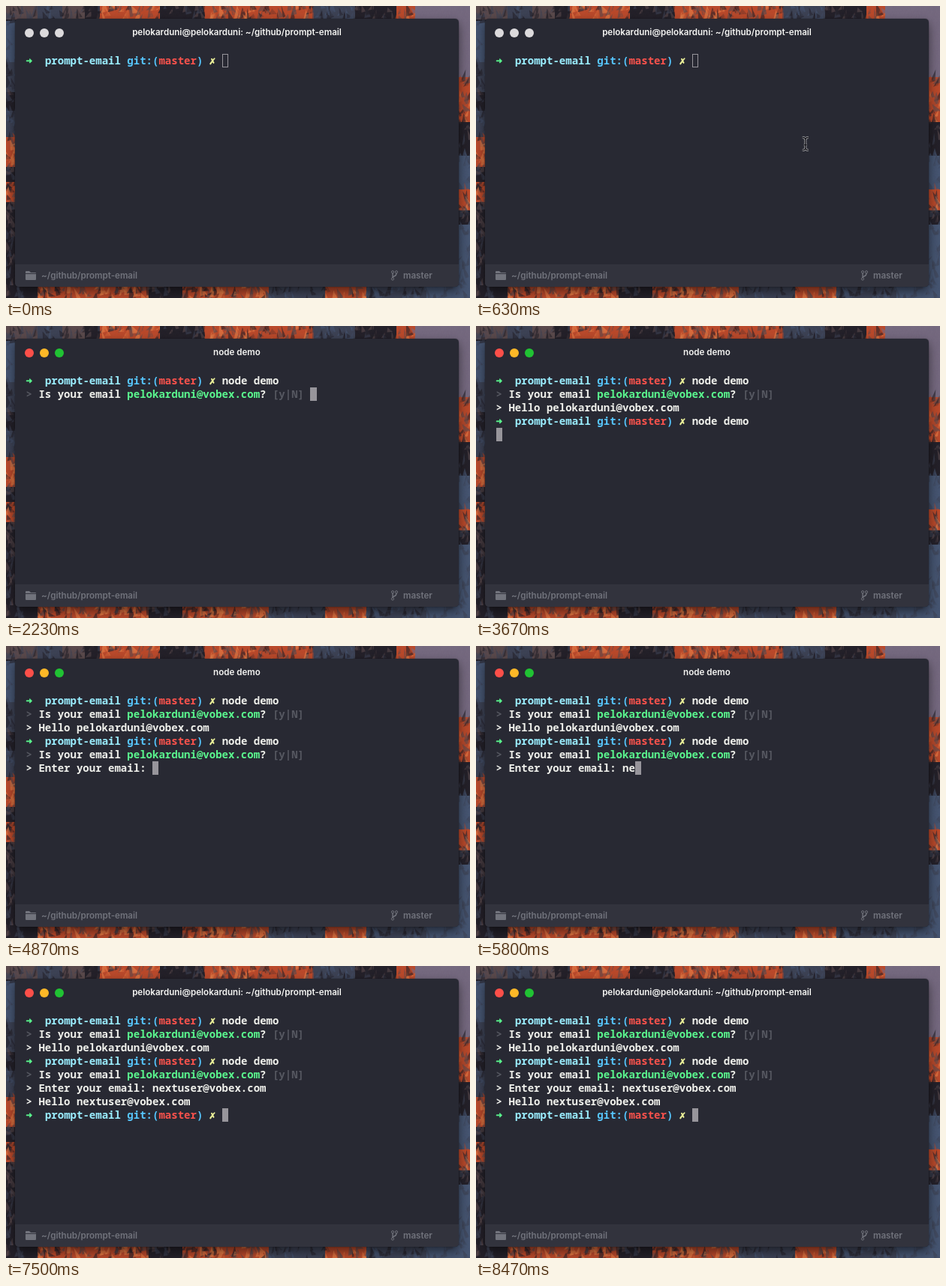
An HTML page with a canvas that plays this animation: 618 px wide and 390 px high, repeating every 8510 ms.

```html
<!DOCTYPE html>
<html lang="en">
<head>
<meta charset="utf-8">
<title>Terminal demo</title>
<style>
  html, body { margin: 0; width: 100%; height: 100%; overflow: hidden; background: #1d1b23; }
  #stage { position: relative; width: 618px; height: 390px; overflow: hidden; }
  #stage > *, #win > * { position: absolute; }
  #win, #shadow { left: 12px; top: 17px; width: 591px; height: 358px; border-radius: 5px; }
  #win { background: #282933; overflow: hidden; font: 600 11.6px/16px Inter, sans-serif; }
  #shadow { box-shadow: 0 6px 14px rgba(0, 0, 0, .5), 0 0 1px #000; }
  #title { left: 0; top: 10px; width: 591px; text-align: center; color: #f4f4f2; }
  #bar { left: 0; top: 328px; width: 591px; height: 30px; background: #32333d; color: #71737c; }
  #bar span { position: absolute; top: 7px; white-space: pre; }
  #term {
    left: 14.6px; top: 47px; margin: 0; isolation: isolate; color: #eff0eb;
    font: 600 14.04px/18px "Noto Sans Mono", "DejaVu Sans Mono", monospace;
  }
  #term div { height: 18px; white-space: pre; }
  .glyph {
    display: inline-block; width: 1ch; height: 18px; vertical-align: top;
    font-family: "DejaVu Sans Mono", monospace; -webkit-text-stroke: .5px;
  }
  .cursor {
    position: absolute; z-index: -1; box-sizing: border-box; width: 1ch; height: 18px;
    border: 1px solid #97959b;
  }
  .focus .cursor { background: #97959b; }
  .green { color: #5af78e; } .cyan { color: #9aedfe; } .blue { color: #57c7ff; }
  .red { color: #f8524c; } .yellow { color: #f3f99d; } .dim { color: #565861; }
  #lights circle { fill: #dcdadc; }
  .focus #lights circle { fill: var(--c); }
</style>
</head>
<body>
<div id="stage">
  <canvas id="desk" width="618" height="390"></canvas>
  <div id="shadow"></div>
  <div id="win">
    <svg id="lights" width="80" height="40">
      <circle cx="19" cy="19" r="6" style="--c:#fc4f49"/>
      <circle cx="39" cy="19" r="6" style="--c:#fdb827"/>
      <circle cx="59" cy="19" r="6" style="--c:#20c233"/>
    </svg>
    <div id="title"></div>
    <pre id="term"></pre>
    <div id="bar">
      <svg width="591" height="30" fill="none" stroke="#71737c">
        <path d="M14 10q0-1 1-1h4l2 2h6q1 0 1 1v8q0 1-1 1H15q-1 0-1-1z" fill="#71737c" stroke="none"/>
        <path d="M14 12.5h14" stroke="#32333d"/>
        <path d="M503 12v6M508 12q0 3-3 4q-2 1-2 2" stroke-width="1.4"/>
        <circle cx="503" cy="10.3" r="1.6"/><circle cx="508" cy="10.3" r="1.6"/><circle cx="503" cy="19.5" r="1.6"/>
      </svg>
      <span style="left:35px">~/github/prompt-email</span>
      <span style="left:517px">master</span>
    </div>
  </div>
  <svg id="mouse" width="12" height="20" fill="none">
    <defs><path id="beam" d="M2 1.5q4 0 4 3v11q0 3-4 3M10 1.5q-4 0-4 3v11q0 3 4 3M4 11.5h4"/></defs>
    <use href="#beam" stroke="#a8a8ac" stroke-width="3"/>
    <use href="#beam" stroke="#15151a" stroke-width="1.4"/>
  </svg>
</div>
<script>
const LOOP = 8510, USER = 'pelokarduni', HOST = 'vobex.com';
const MAIL = USER + '@' + HOST, OTHER = 'nextuser@' + HOST;
const $ = id => document.getElementById(id);
const ink = (color, text) => `<span class="${color}">${text}</span>`;

const PROMPT = ink('green glyph', '➜') + '  ' + ink('cyan', 'prompt-email') + ' ' +
  ink('blue', 'git:(') + ink('red', 'master') + ink('blue', ')') + ' ' + ink('yellow glyph', '✗') + ' ';
const QUESTION = ink('dim', '&gt;') + ' Is your email ' + ink('green', MAIL) + '? ' + ink('dim', '[y|N]') + ' ';
const say = text => '&gt; ' + text;

function screen(t) {
  const typed = (text, start, step) => text.slice(0, Math.max(0, Math.floor((t - start) / step) + 1));
  const lines = [PROMPT + typed('node demo', 1330, 48)];
  const add = (start, text) => t >= start && lines.push(text);
  let ghost = '';

  add(1780, t < 2000 ? '' : QUESTION);
  add(2870, say('Hello ' + MAIL));
  add(2930, PROMPT + (t < 3430 ? '' : 'node demo'));
  add(3640, t < 3830 ? '' : QUESTION);
  let answer = typed(OTHER.slice(0, 9), 5570, 130);
  if (t >= 7100) answer = OTHER;
  else if (answer.endsWith('@')) ghost = ink('dim', HOST);
  add(4700, say('Enter your email: ' + answer));
  add(7330, say('Hello ' + OTHER));
  add(7430, PROMPT);

  lines.push(lines.pop() + '<span class="cursor"></span>' + ghost);
  return lines.map(line => `<div>${line}</div>`).join('');
}

// Rocky desktop: colour runs along each edge, broken up by seeded shards.
function paintDesk() {
  const g = $('desk').getContext('2d');
  const tones = {
    d: '#24212a', s: '#3d4355', n: '#465571', o: '#b94a2c', l: '#e98249', b: '#5a4a4c', y: '#75697f'
  };
  const mixes = { d: 'ddddsb', s: 'ssnsd', n: 'nnns', o: 'oooldb', b: 'bbds', y: 'y' };
  let seed = 17;
  const rnd = () => (seed = seed * 16807 % 2147483647) / 2147483647;

  function edge(runs, x, y, length, down) {
    const stops = runs.split(' ').map(r => [r[0], +r.slice(1)]);
    stops.forEach(([tone, from], i) => {
      const to = i + 1 < stops.length ? stops[i + 1][1] : length;
      g.globalAlpha = 1;
      g.fillStyle = tones[tone];
      down ? g.fillRect(x, from, 18, to - from) : g.fillRect(from, y, to - from, 18);
      g.globalAlpha = .6;
      for (let p = from; p < to; p += 1.5) {
        const mix = mixes[tone], across = rnd() * 18;
        const cx = down ? x + across : p, cy = down ? p : y + across;
        const w = 2 + rnd() * 5, h = 3 + rnd() * 8, lean = rnd() * 12 - 6;
        g.fillStyle = tones[mix[Math.floor(rnd() * mix.length)]];
        g.beginPath();
        g.moveTo(cx + lean, cy - h);
        g.lineTo(cx + w, cy + h / 2);
        g.lineTo(cx - w / 2, cy + h * .7);
        g.fill();
      }
    });
  }
  edge('d0 n20 s75 d115 s140 o175 d215 o235 d262', 0, 0, 390, true);
  edge('y0 o95 d155 n200 o245 d273 n292', 600, 0, 390, true);
  edge('d0 o42 d190 o235 s350 o425 s480 n560', 0, 373, 618);
  edge('b0 s42 b75 d105 o125 d205 o265 s410 d465 o520 y545', 0, 0, 618);
}

function draw() {
  const t = performance.now() % LOOP;
  const running = t >= 1800 && t < 2930 || t >= 3640 && t < 7430;
  $('stage').className = t >= 900 ? 'focus' : '';
  $('title').textContent = running ? 'node demo' : `${USER}@${USER}: ~/github/prompt-email`;
  const html = screen(t);
  if (html !== draw.last) $('term').innerHTML = draw.last = html;

  const left = (1 - Math.min(1, Math.max(0, (t - 30) / 840))) ** 3;
  $('mouse').style.display = t >= 60 && t < 1330 ? '' : 'none';
  $('mouse').style.transform = `translate(${429 + 165 * left}px, ${177 - 130 * left}px)`;
  requestAnimationFrame(draw);
}

paintDesk();
draw();
</script>
</body>
</html>
```
